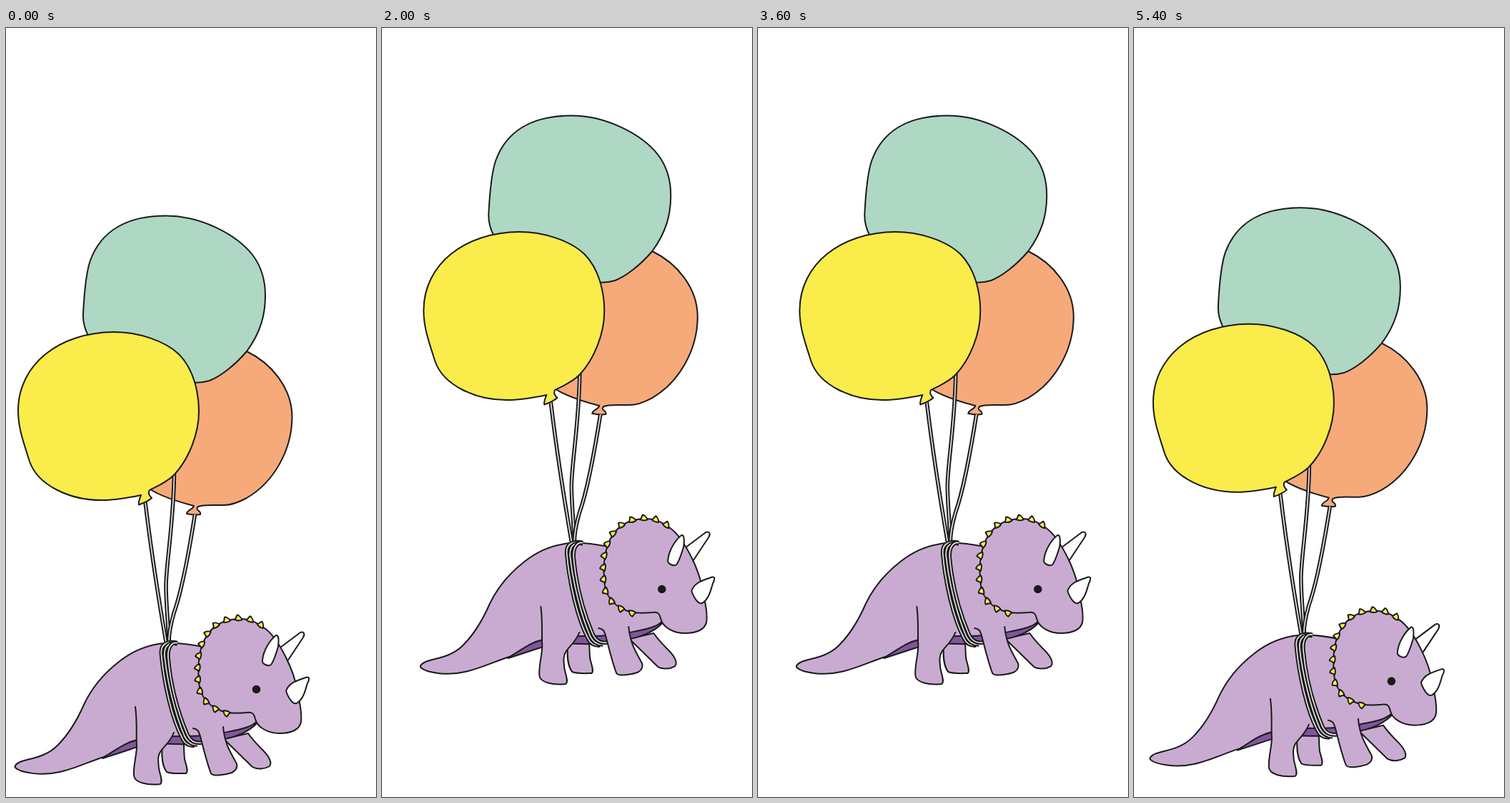
Animation of 518x1075 px, one loop 5.6 s. Source, as an HTML page:

```html
<!DOCTYPE html>
<html lang="en">
<head>
<meta charset="utf-8">
<title>Balloon ride</title>
<style>
  html, body { margin: 0; width: 100%; height: 100%; overflow: hidden; background: #fff; }
  svg { display: block; width: 100vw; height: 100vh; }
  path { stroke: #1a1a1a; stroke-width: 2; stroke-linejoin: round; stroke-linecap: round; }
  .skin { fill: #c9abd2; }
  .dark { fill: #80559c; }
  .mint { fill: #aed7c4; }
  .sun { fill: #faec4b; }
  .peach { fill: #f6aa7a; }
  .horn { fill: #fff; }
  .rope path { fill: none; stroke-width: 5.6; stroke-linecap: butt; }
  .rope path.core { stroke: #e4e4e4; stroke-width: 1.7; }
</style>
</head>
<body>
<svg viewBox="0 0 518 1075">
  <g id="ride">
    <!-- balloons and strings -->
    <path class="peach" d="M337 452C370 468 401 502 400.5 545C400 590 375 635 337 657C326 663 316 667 305 667C293 667.5 278 665.5 269 669C266 672 268 674 270 675C273 677 272 679 272 680C265 681 258 680 253 679C253 674 262 673 263 668C240 662 218 655 202 645L200 560L260 460Z"/>
    <path class="mint" d="M108 400C109 380 111 345 118 325C133 284 169 262.5 224 262.5C272 262.5 322 288 345 317C358 334 363 352 363 374C363 400 357 425 337 452C320 472 300 487 285 493C278 495 270 496 263 495.5L160 490L115 430C110 420 107.5 412 108 400Z"/>
    <g class="rope">
      <path d="M235.5 620C235 690 224 750 224 780C224 805 227 830 228 858"/>
      <path d="M264.5 680C255 740 245 790 235 818C231 832 228 845 228 858"/>
      <path d="M195 663C203 730 214 800 224 858"/>
    </g>
    <path class="sun" d="M17 535C17 470 75 425.5 151 425C185 425 222 437 242 456C262 476 270 508 270 536C270 567 256 603 235 625C225 635 213 640 201 646C198 650 202 655 204 657C200 661 190 665 186 666.5C185 662 188 656 189 653C170 657 150 660.5 133 660C90 660 45 640 33 606C25 580 17 560 17 535Z"/>

    <!-- far legs, belly, body -->
    <path class="skin" d="M219 1000C217 1020 220 1034 225 1040C232 1043 245 1042 252 1042C256 1040 252 1030 250 1022C249 1012 249 1006 249 998Z"/>
    <path class="skin" d="M305 994L345 1033C352 1037 362 1036 369 1032C373 1027 368 1018 360 1010C352 1002 345 995 339 986Z"/>
    <path class="dark" d="M135 1021C150 1009 165 1000 184 995L351 972C340 984 320 992 300 995C280 999 262 1002 240 1001C215 1000 190 1002 175 1008C160 1013 145 1018 135 1021Z"/>
    <path class="skin" d="M13 1031C20 1020 50 1025 72 1003C90 985 102 962 109 946C122 918 140 900 158 886C178 870 200 862 222 860C240 859 260 862 275 865L340 900L352 968C345 978 325 981 305 985C290 989 270 990 245 990C220 990 200 990 184 995C165 999 152 1011 137 1019C115 1026 95 1036 75 1040C50 1046 20 1041 13 1034Q12 1032 13 1031Z"/>
    <path class="skin" d="M181 949C184 970 182 990 183 1003C183 1018 178 1030 179 1045C180 1055 198 1059 216 1057C220 1054 216 1045 214 1035C213 1025 212 1018 216 1012C222 1003 230 998 235 985"/>
    <g class="rope">
      <path d="M238 859C224 857 216 862 217.5 876C221 915 232 965 247 993Q252 1004 264 1003"/>
      <path d="M240 861C228 858 221 864 222 878C226 915 237 960 250 990Q256 1002 268 1002"/>
      <path d="M240 859.5C232 858 226 866 227 880C230 915 240 955 254 988Q260 1001 274 999"/>
    </g>
    <path class="skin" d="M262 979C270 980 270 985 272 990C277 1010 282 1030 287 1042C289 1046 305 1045 316 1041C324 1037 325 1030 321 1025C314 1012 306 1000 304 977"/>

    <!-- head -->
    <path class="horn" d="M380 869L412 845C417 843 419 847 416 852L392 888Z"/>
    <path id="head" class="skin" d="M309 957C290 952 272 940 270 915C268 890 270 870 278 855C288 835 305 826 328 826C343 826 352 832 362 839C372 846 383 862 392 880C400 896 406 915 408 927C410 940 415 955 413 970C411 982 397 986 383 986C367 986 352 978 349 966C347 957 343 956 337 957C328 958 318 958 309 957Z"/>
    <g id="frill"></g>
    <path class="horn" d="M359 884C360 870 370 855 378 849C382 848 382 856 381 865C378 875 375 885 371 890C367 893 358 889 359 884Z"/>
    <path class="horn" d="M392 927C396 915 408 912 421 907.5C425 907 425 911 422 916C419 925 417 938 407 944C402 946 396 938 392 927Z"/>
    <circle cx="350.5" cy="924.5" r="5.8" fill="#1a1a1a"/>
  </g>
</svg>
<script>
  const ride = document.getElementById('ride');
  const head = document.getElementById('head');
  const frill = document.getElementById('frill');

  // light core on every rope strand
  for (const strand of document.querySelectorAll('.rope path')) {
    const core = strand.cloneNode();
    core.setAttribute('class', 'core');
    strand.after(core);
  }

  // evenly spaced spikes along the edge of the head
  const SPIKES = 14, GAP = 16.5;
  for (let i = 0; i < SPIKES; i++) {
    const a = head.getPointAtLength(i * GAP);
    const b = head.getPointAtLength(i * GAP + 1);
    const turn = Math.atan2(b.y - a.y, b.x - a.x) * 180 / Math.PI;
    const spike = head.cloneNode();
    spike.removeAttribute('id');
    spike.setAttribute('class', 'sun');
    spike.setAttribute('transform', `translate(${a.x} ${a.y}) rotate(${turn})`);
    spike.setAttribute('d', 'M-5 1C-3.5 0 -3 -3 -1.5 -5.5C1 -5 4 -2 5 1.5Q0 3.5 -5 1Z');
    frill.append(spike);
  }

  // turning points of the swaying climb: [step, x, y]; the way down mirrors it
  const STEP = 200, PEAK = 14;
  const turns = [[0, 0, 0], [3, 39.5, -34], [6.9, 10, -94.5], [11.5, 51.2, -162], [PEAK, 34.5, -208.6]];

  function place(step) {
    const i = turns.findIndex(([end]) => step < end);
    const [s0, x0, y0] = turns.at(i < 0 ? -2 : i - 1);
    const [s1, x1, y1] = turns.at(i);
    const t = (step - s0) / (s1 - s0);
    const sway = (1 - Math.cos(Math.PI * t)) / 2;
    return [x0 + (x1 - x0) * sway, y0 + (y1 - y0) * t];
  }

  function draw() {
    const step = Math.floor(performance.now() / STEP) % (2 * PEAK);
    const [x, y] = place(PEAK - Math.abs(PEAK - step));
    ride.setAttribute('transform', `translate(${x} ${y})`);
    requestAnimationFrame(draw);
  }
  draw();
</script>
</body>
</html>
```
